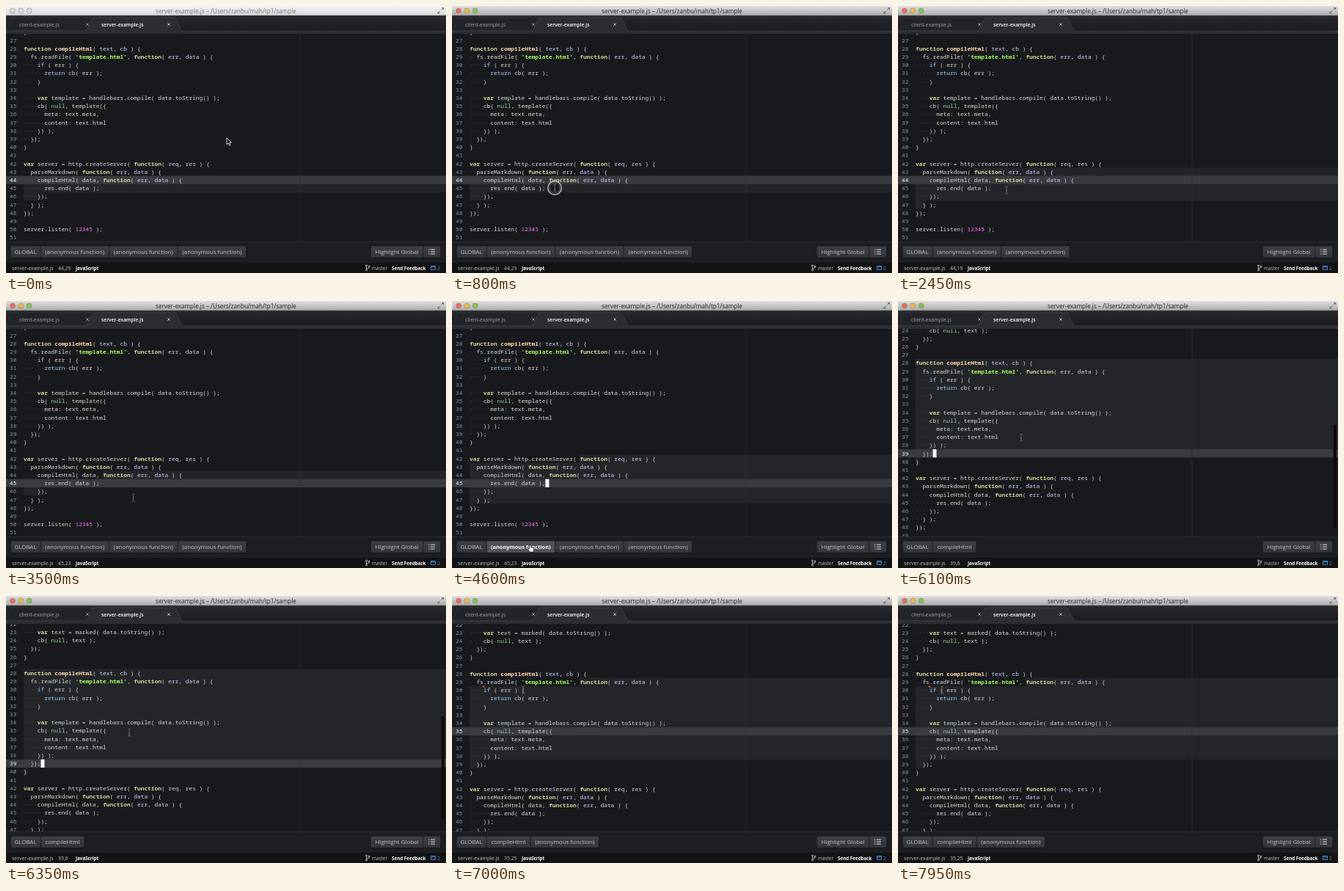
Write an HTML page that moves like this. It is 600x364 px and loops after 8 s.

```html
<!DOCTYPE html>
<html lang="en">
<head>
<meta charset="utf-8">
<title>Scope bar in a code editor</title>
<style>
html, body { margin: 0; width: 100%; height: 100%; overflow: hidden; background: #18191c; }
svg { display: block; width: 600px; height: 364px; }
text { font-family: "Open Sans", "Noto Sans", sans-serif; white-space: pre; }
.code text { font: 500 7.83px "Noto Sans Mono", "Liberation Mono", monospace; fill: #d6d9d7; }
.code .num { font-weight: 400; fill: #909295; }
.code .num.on { fill: #fff; }
.code .dots { fill: #4b4d52; }
.storage, .string, .name { font-weight: 600; }
.storage { fill: #d8d49a; }
.keyword { fill: #9fd1ff; }
.string { fill: #a8ff60; }
.number { fill: #ff73fd; }
.const { fill: #99cc99; }
.name { fill: #ffd9b0; }
.param { fill: #d0cfff; }
.button text { font-size: 7.93px; fill: #c2c4c8; text-anchor: middle; }
.button.hover text { font-weight: 700; font-size: 7.4px; fill: #fff; }
.button.hover rect { fill: #505257; }
.status text { font-size: 6.9px; fill: #c0c2c5; }
.status .strong { font-weight: 700; font-size: 6.25px; fill: #fff; }
</style>
</head>
<body>
<svg viewBox="0 0 600 364" xmlns="http://www.w3.org/2000/svg">
  <defs>
    <linearGradient id="titleFill" x2="0" y2="1"><stop stop-color="#e0e0e0"/><stop offset="1" stop-color="#ababab"/></linearGradient>
    <linearGradient id="idleFill" x2="0" y2="1"><stop stop-color="#f5f5f5"/><stop offset="1" stop-color="#d8d8d8"/></linearGradient>
    <linearGradient id="buttonFill" x2="0" y2="1"><stop stop-color="#3d3f43"/><stop offset="1" stop-color="#323438"/></linearGradient>
    <linearGradient id="tabBar" x2="0" y2="1"><stop stop-color="#27292c"/><stop offset="1" stop-color="#1b1c1f"/></linearGradient>
    <clipPath id="view"><rect y="37" width="600" height="284"/></clipPath>
  </defs>

  <rect width="600" height="364" fill="#18191c"/>
  <g class="code" clip-path="url(#view)">
    <g id="scroller">
      <path id="scope" fill="#232529"/>
      <rect id="activeLine" width="600" height="11.2" fill="#393b40"/>
      <g id="lines"></g>
      <path id="lint" d="M41 74.6h4l-2 2.6z" fill="#d8524a"/>
      <rect id="caret" width="5" height="11.2" fill="#fff"/>
    </g>
    <path d="M401 37V321" stroke="#2b2d31" stroke-width="1"/>
    <rect id="scrollbar" x="593.8" width="4" height="141" rx="2" fill="#0a0b0c"/>
  </g>

  <rect y="13" width="600" height="21" fill="url(#tabBar)"/>
  <path d="M0 34L8 17.5Q9 16 11 16H114Q117 16 118 18L126 34Z" fill="#222427" stroke="#34363a" stroke-width=".7"/>
  <path d="M0 34H110L118 17.5Q119 16 121 16H228Q231 16 232 18L240 34H600V38H0Z" fill="#2b2d31"/>
  <path d="M0 34H110L118 17.5Q119 16 121 16H228Q231 16 232 18L240 34H600" fill="none" stroke="#45474c" stroke-width=".7"/>
  <text x="18" y="27.5" font-size="7.03" fill="#a4a6a9">client-example.js</text>
  <text x="130" y="27.5" font-size="6.75" font-weight="600" fill="#fff">server-example.js</text>
  <path d="M109.2 23.4l3.4 3.4m0-3.4l-3.4 3.4" stroke="#a4a6a9"/>
  <path d="M220.3 23.4l3.4 3.4m0-3.4l-3.4 3.4" stroke="#c4c6c9"/>

  <rect id="titleBar" width="600" height="13"/>
  <path d="M0 13H600" stroke="#555" stroke-width=".7"/>
  <g id="lights"></g>
  <text id="title" x="300" y="9.5" font-size="8.15" text-anchor="middle">server-example.js – /Users/zanbu/mah/tp1/sample</text>
  <path d="M593.5 5.5l3-3m-2.4 0h2.4v2.4M592 7l-3 3m0-2.4v2.4h2.4" fill="none" stroke="#686868"/>

  <rect y="321" width="600" height="29" fill="#1d1e21"/>
  <path d="M0 321.4H600" stroke="#303236" stroke-width=".8"/>
  <g id="crumbs"></g>
  <g id="tools"></g>
  <path d="M579 332.2h6m-6 3h6m-6 3h6M576 332.2h1.4m-1.4 3h1.4m-1.4 3h1.4" stroke="#c0c2c5" stroke-width="1.2"/>

  <g class="status">
    <rect y="350" width="600" height="14" fill="#121315"/>
    <text x="8" y="359.5">server-example.js</text>
    <text id="position" x="71" y="359.5"></text>
    <text class="strong" x="95" y="359.5">JavaScript</text>
    <g fill="none" stroke="#c0c2c5" stroke-width=".9">
      <circle cx="491.5" cy="354" r="1"/><circle cx="491.5" cy="360" r="1"/><circle cx="495" cy="355" r="1"/>
      <path d="M491.5 355v4q0-1.4 2-1.4t1.5-1.8"/>
    </g>
    <text x="499" y="359.5" style="font-size:6.4px">master</text>
    <text class="strong" x="526" y="359.5">Send Feedback</text>
    <path d="M579.5 354.5h6v5h-6zM579.5 356h6" fill="none" stroke="#5293d8" stroke-width=".9"/>
    <text x="588" y="359.5" style="fill:#5293d8">2</text>
  </g>

  <g id="pointer">
    <g id="ring" fill="none">
      <circle r="9.3" fill="#111" fill-opacity=".5" stroke="#c9c9c9" stroke-width="1.3"/>
      <circle r="7.2" stroke="#77797c" stroke-width=".8"/>
    </g>
    <path id="arrow" d="M0 0V8.6L2 6.8L3.5 10.2L5.1 9.5L3.6 6.2H6.3Z" fill="#111" stroke="#fff" stroke-width=".8"/>
    <path id="beam" d="M-2-5Q0-5 0-3.8Q0-5 2-5M0-4V4M-2 5Q0 5 0 3.8Q0 5 2 5M-1 1H1" fill="none" stroke="#6c6e71" stroke-width=".9"/>
    <path id="hand" d="M-1.6-4Q-.6-5.2 .3-4V-1Q1.3-1.7 1.9-.7Q2.9-1.2 3.3-.2Q4.7-.5 4.6 1L4 5H-1L-3.6 1.2Q-3.2-.2-1.6 1Z" fill="#fff" stroke="#111" stroke-width=".7"/>
  </g>
</svg>

<script>
const LOOP = 8000, FIRST = 22, PITCH = 11.2, CHAR = 4.7, LEFT = 24;
const $ = id => document.getElementById(id);
const source = `
    var text = marked( data.toString() );
    cb( null, text );
  });
}

function compileHtml( text, cb ) {
  fs.readFile( 'template.html', function( err, data ) {
    if ( err ) {
      return cb( err );
    }

    var template = handlebars.compile( data.toString() );
    cb( null, template({
      meta: text.meta,
      content: text.html
    }) );
  });
}

var server = http.createServer( function( req, res ) {
  parseMarkdown( function( err, data ) {
    compileHtml( data, function( err, data ) {
      res.end( data );
    });
  } );
});

server.listen( 12345 );

`.split("\n");

const anonymous = (from, to) => ({ label: "(anonymous function)", width: 93.6, from, to });
const handler = anonymous(42, 48), parsed = anonymous(43, 47), compiled = anonymous(44, 46);
const compileHtml = { label: "compileHtml", width: 60, from: 28, to: 40 };
const readFile = anonymous(29, 39);
const globalScope = { label: "GLOBAL", width: 41 };
const outer = [handler, parsed], inner = [...outer, compiled];

// time, line, column, scopes around the caret
const carets = [
  [0, 44, 29, inner], [900, 45, 23, inner],
  [1600, 44, 23, outer], [1700, 44, 22, outer], [1800, 44, 21, outer], [1900, 44, 20, outer], [2000, 44, 19, outer],
  [2600, 44, 20, outer], [2680, 44, 21, outer], [2760, 44, 22, outer], [2830, 44, 23, outer], [2900, 45, 23, inner],
  [5200, 39, 6, [compileHtml]], [6500, 35, 25, [compileHtml, readFile]]
];
// time, x, y
const path = [
  [0, 301, 180], [100, 301, 180], [700, 140, 248], [950, 140, 248], [1250, 148, 251], [3400, 148, 251],
  [3750, 275, 336], [3880, 275, 336], [4050, 190, 337], [4150, 190, 337], [4350, 107, 337], [4850, 107, 337],
  [5130, 168, 186], [6620, 168, 186], [6960, 97, 128], [7480, 97, 128], [7800, 60, 128], [LOOP, 60, 128]
];
const scrolls = [[0, 0], [5800, 0], [6080, 26.5], [6140, 26.5], [6380, 48], [LOOP, 48]];
const clicks = [720, 5140, 6440];

const lineY = n => 58 + (n - 28) * PITCH;
const lineTop = n => lineY(n) - PITCH / 2;
const last = (rows, t) => rows.findLast(row => row[0] <= t);
const show = (id, on) => $(id).setAttribute("visibility", on ? "visible" : "hidden");
const set = (id, attrs) => Object.entries(attrs).forEach(([k, v]) => $(id).setAttribute(k, v));

function tween(rows, t) {
  const i = Math.max(1, rows.findIndex(row => row[0] > t));
  const a = rows[i - 1], b = rows[i];
  const u = (t - a[0]) / (b[0] - a[0]), ease = u * u * (3 - 2 * u);
  return a.slice(1).map((v, k) => v + (b[k + 1] - v) * ease);
}

function colour(code) {
  const span = (kind, s) => `<tspan class="${kind}">${s}</tspan>`;
  const token = /'[^']*'|\b(?:function|var|if|return|null|\d+)\b|\bcompileHtml(?=\( @text)/g;
  const kinds = { function: "storage", var: "storage", if: "keyword", return: "keyword", null: "const", compileHtml: "name" };
  return code.replace(/(function(?: \w+)?\()([^)]*)(?=\))/g, (_, head, args) =>
      head + args.replace(/\w+/g, "@$&"))
    .replace(token, s => span(kinds[s] || (s[0] === "'" ? "string" : "number"), s))
    .replace(/@(\w+)/g, (_, s) => span("param", s));
}

$("lines").innerHTML = source.map((line, i) => {
  const n = FIRST + i, y = lineY(n) + 2.8;
  const code = line.trimStart(), indent = line.length - code.length;
  return `<text class="num" id="num${n}" x="5" y="${y}">${n}</text>` +
    `<text class="dots" x="${LEFT}" y="${y}">${"·".repeat(indent)}</text>` +
    `<text x="${LEFT + indent * CHAR}" y="${y}">${colour(code)}</text>`;
}).join("");

// from the word "function" to its closing brace
function scopeShape({ from, to }) {
  const x1 = LEFT + source[from - FIRST].indexOf("function") * CHAR;
  const x2 = LEFT + (source[to - FIRST].indexOf("}") + 1) * CHAR;
  const y1 = lineTop(from), y2 = lineTop(to);
  return `M${x1} ${y1}H600V${y2}H${x2}v${PITCH}H${LEFT}V${y1 + PITCH}H${x1}Z`;
}

function buttons(items, x, hovered) {
  const total = items.reduce((sum, b) => sum + b.width, 0);
  let out = `<rect x="${x}" y="327" width="${total}" height="16.5" rx="2.5" fill="url(#buttonFill)" stroke="#101113" stroke-width=".8"/>`;
  items.forEach((b, i) => {
    out += `<g class="button${b === hovered ? " hover" : ""}">` +
      `<rect x="${x + .5}" y="327.5" width="${b.width - 1}" height="15.5" fill="none"/>` +
      (i ? `<path d="M${x} 327V343.5" stroke="#191a1d" stroke-width=".9"/>` : "") +
      `<text x="${x + b.width / 2}" y="338.2">${b.label}</text></g>`;
    x += b.width;
  });
  return out;
}
$("tools").innerHTML = buttons([{ label: "Highlight Global", width: 72 }, { label: "", width: 24 }], 497);

const lightColours = ["#ee6a5c", "#efb94a", "#83c256"];
$("lights").innerHTML = lightColours.map((c, i) =>
  `<circle cx="${9 + i * 11.3}" cy="6.4" r="3.5" stroke="#808080" stroke-width=".6"/>`).join("");

function hoveredScope(scopes, x, y) {
  if (y < 327 || y > 344) return null;
  let right = 6 + globalScope.width;
  return x < right ? null : scopes.find(s => x < (right += s.width));
}

let crumbKey, activeNumber;
function draw(t) {
  const [since, line, column, scopes] = last(carets, t);
  const [x, y] = tween(path, t);
  const hovered = hoveredScope(scopes, x, y);
  const focused = t >= 750;

  set("scroller", { transform: `translate(0 ${tween(scrolls, t)[0]})` });
  set("scope", { d: scopeShape(hovered || scopes.at(-1)) });
  set("activeLine", { y: lineTop(line) });
  set("caret", { x: LEFT + (column - 1) * CHAR, y: lineTop(line) });
  show("caret", t >= 900 && (t - since) % 800 < 400);
  show("lint", t >= 6500);
  show("scrollbar", t >= 5800 && t < 6750);
  set("scrollbar", { y: 174 - tween(scrolls, t)[0] * .22 });

  if (activeNumber !== line) {
    if (activeNumber) $("num" + activeNumber).classList.remove("on");
    $("num" + line).classList.add("on");
    activeNumber = line;
  }
  const key = since + ":" + scopes.indexOf(hovered);
  if (key !== crumbKey) {
    $("crumbs").innerHTML = buttons([globalScope, ...scopes], 6, hovered);
    $("position").textContent = line + "," + column;
    crumbKey = key;
  }

  set("titleBar", { fill: focused ? "url(#titleFill)" : "url(#idleFill)" });
  [...$("lights").children].forEach((light, i) => light.setAttribute("fill", focused ? lightColours[i] : "#e0e0e0"));
  set("title", { fill: focused ? "#222" : "#777" });

  set("pointer", { transform: `translate(${x} ${y})` });
  const overBar = y > 321;
  show("arrow", t < 720 || overBar && !hovered);
  show("hand", !!hovered);
  show("beam", t >= 720 && !overBar);
  show("ring", clicks.some(c => t >= c && t < c + 180));
}

const start = performance.now();
(function frame() {
  draw((performance.now() - start) % LOOP);
  requestAnimationFrame(frame);
})();
</script>
</body>
</html>
```
